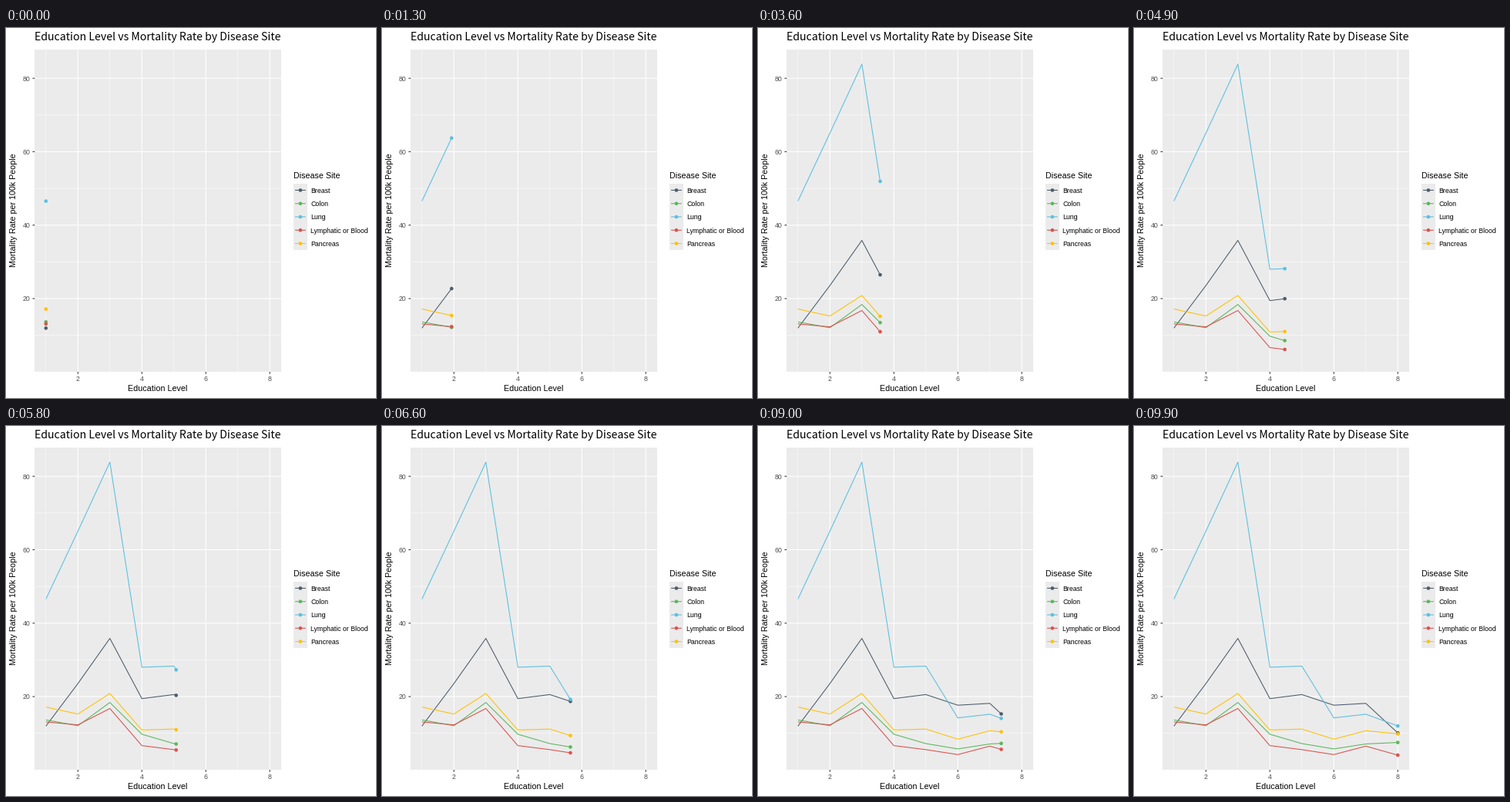
A matplotlib script for the animation above (10 s loop, 480 by 480 pixels).

```python
import numpy as np
import matplotlib.pyplot as plt
from matplotlib.animation import FuncAnimation
from matplotlib.patches import Circle, Rectangle

SIZE, DPI = 480, 72            # at 72 dpi one point is one pixel
FRAMES, INTERVAL = 100, 100
LEFT, RIGHT, TOP, BOTTOM = 37.25, 356.75, 27.9, 446.0
XLIM, YLIM = (0.65, 8.35), (0.06, 87.84)
GREY, THICK, THIN, RADIUS = "#EBEBEB", 1.07, 0.53, 2.3

SERIES = {
    "Breast": ("#4E5D6C", [11.95, 23.55, 35.85, 19.45, 20.55, 17.65, 18.15, 10.1]),
    "Colon": ("#5CB85C", [13.65, 12.05, 18.4, 9.75, 7.2, 5.75, 7.1, 7.5]),
    "Lung": ("#5BC0DE", [46.55, 65.05, 83.85, 28.0, 28.3, 14.2, 15.2, 12.0]),
    "Lymphatic or Blood": ("#D9534F", [13.1, 12.3, 16.75, 6.65, 5.55, 4.2, 6.5, 4.05]),
    "Pancreas": ("#FFC107", [17.15, 15.25, 20.85, 10.9, 11.15, 8.4, 10.7, 9.85]),
}
LEVELS = np.arange(1, 9)
# Each level is reached on a whole frame
KEYS = np.round((LEVELS - 1) / 7 * (FRAMES - 1))

plt.rcParams["font.family"] = "Liberation Sans"
fig = plt.figure(figsize=(SIZE / DPI, SIZE / DPI), dpi=DPI, facecolor="white")
ax = fig.add_axes([0, 0, 1, 1])
ax.set(xlim=(0, SIZE), ylim=(SIZE, 0))
ax.axis("off")


def px(x):
    return LEFT + (np.asarray(x) - XLIM[0]) / (XLIM[1] - XLIM[0]) * (RIGHT - LEFT)


def py(y):
    return BOTTOM - (np.asarray(y) - YLIM[0]) / (YLIM[1] - YLIM[0]) * (BOTTOM - TOP)


def line(xs, ys, color, width=THICK, z=2):
    return ax.plot(xs, ys, color=color, lw=width, zorder=z, snap=False,
                   solid_capstyle="butt", solid_joinstyle="round")[0]


def dot(x, y, color):
    # A patch keeps its sub-pixel place, a marker would be rounded
    return ax.add_patch(Circle((x, y), RADIUS, fc=color, ec="none", zorder=4, snap=False))


def box(x, y, w, h):
    ax.add_patch(Rectangle((x, y), w, h, fc=GREY, ec="none", zorder=0))


def text(x, y, s, size, color="black", ha="left", **kw):
    ax.text(x, y, s, fontsize=size, color=color, ha=ha, va="baseline", **kw)


def draw_panel():
    box(LEFT, TOP, RIGHT - LEFT, BOTTOM - TOP)
    for v in (1, 3, 5, 7):
        line([px(v)] * 2, [TOP, BOTTOM], "white", THIN, 1)
    for v in (10, 30, 50, 70):
        line([LEFT, RIGHT], [py(v)] * 2, "white", THIN, 1)
    for v in (2, 4, 6, 8):
        line([px(v)] * 2, [TOP, BOTTOM], "white", THICK, 1.5)
        line([px(v)] * 2, [BOTTOM, BOTTOM + 2.75], "#333333")
        text(px(v), 458, str(v), 8.8, "#4D4D4D", "center")
    for v in (20, 40, 60, 80):
        line([LEFT, RIGHT], [py(v)] * 2, "white", THICK, 1.5)
        line([LEFT - 2.75, LEFT], [py(v)] * 2, "#333333")
        text(31.6, py(v) + 3.3, str(v), 8.8, "#4D4D4D", "right")
    text(LEFT - 0.4, 16, "Education Level vs Mortality Rate by Disease Site", 14.15,
         family="Noto Sans CJK JP")
    text((LEFT + RIGHT) / 2, 471, "Education Level", 10.7, ha="center")
    text(13, (TOP + BOTTOM) / 2 - 0.6, "Mortality Rate per 100k People", 10.6,
         ha="center", rotation=90, rotation_mode="anchor")


def draw_legend():
    x, y, key = RIGHT + 16.5, 201.8, 17.28
    text(x - 0.4, 195, "Disease Site", 10.65)
    box(x, y, key, key * len(SERIES))
    for i, (name, (color, _)) in enumerate(SERIES.items()):
        mid = y + (i + 0.5) * key
        line([x + 0.1 * key, x + 0.9 * key], [mid, mid], color)
        dot(x + key / 2, mid, color)
        text(x + key + 4.8, mid + 3.5, name, 8.7)


draw_panel()
draw_legend()
trails = [(line([], [], c, z=3), dot(0, 0, c), np.array(v)) for c, v in SERIES.values()]


def update(frame):
    past = KEYS < frame
    x = np.interp(frame, KEYS, LEVELS)
    for path, head, values in trails:
        y = np.interp(frame, KEYS, values)
        path.set_data(px(np.append(LEVELS[past], x)), py(np.append(values[past], y)))
        head.center = px(x), py(y)
    return [artist for trail in trails for artist in trail[:2]]


anim = FuncAnimation(fig, update, frames=FRAMES, interval=INTERVAL,
                     repeat=True, repeat_delay=0, blit=False)
plt.show()
```
